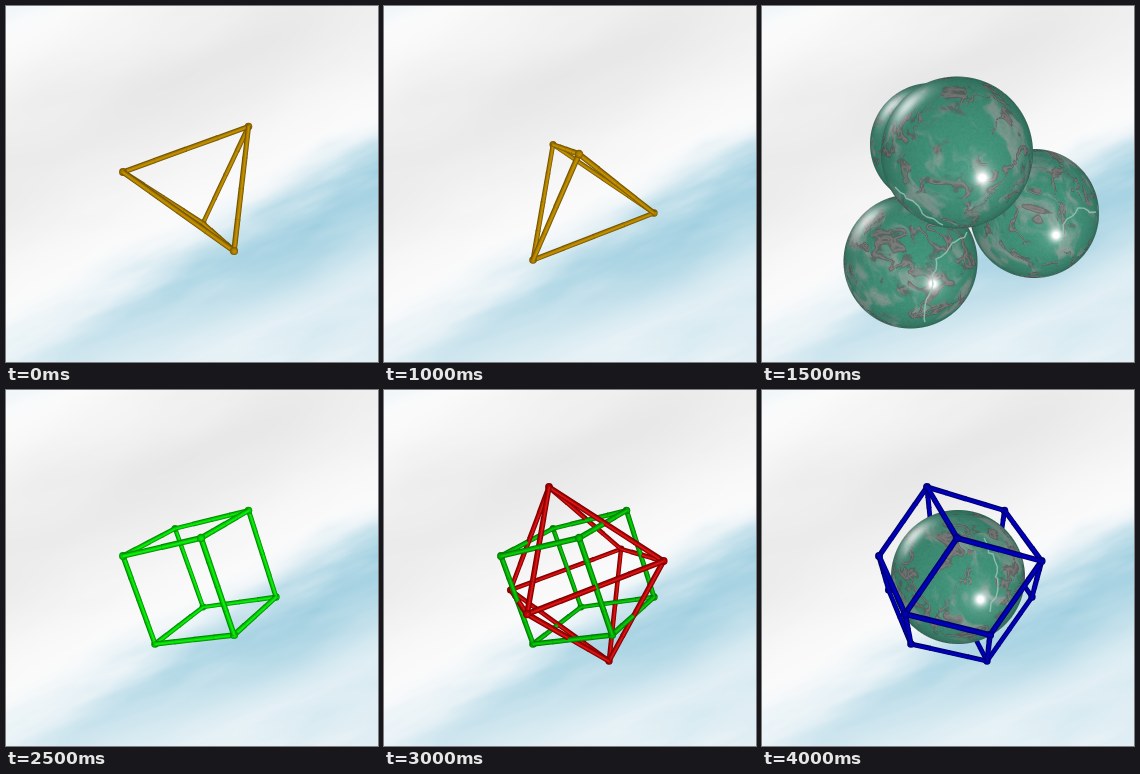
Recreate the animation shown at these times as an HTML page with a canvas. Size 372 by 356 pixels, loop 4.5 s.

```html
<!DOCTYPE html>
<html lang="en">
<head>
<meta charset="utf-8">
<title>Polyhedra and spheres</title>
<style>
  html, body { margin: 0; width: 100%; height: 100%; overflow: hidden; background: #eee; }
  canvas { display: block; }
</style>
</head>
<body>
<canvas id="stage" width="372" height="356"></canvas>
<script>
const W = 372, H = 356, STEP = 500;

// Each point: x, y, nearness (1 = closest)
const points = {
  A: [117, 166, .33], B: [242.5, 120.5, 0], C: [228, 245, .72], D: [197, 217, -.95],
  E: [195, 148, .95], F: [149, 254, .05], G: [270, 207, -.33], H: [169, 138.5, -.72],
  P: [165, 97, .25], Q: [279.5, 171, .65], R: [225, 271, -.25],
  S: [126.5, 200, -.65], T: [143, 224, 1], U: [237, 159, -1]
};
const TETRA = 'AB AC AD BC BD CD';
const DUAL = 'EF EG EH FG FH GH';
const CUBE = 'AH HB BE EA AF EC BG HD FC CG GD DF';
const OCTA = 'PQ PS PT PU RQ RS RT RU QT QU ST SU';
const RHOMBIC = 'PA PE PB PH TA TE TC TF QE QB QG QC RC RF RG RD SA SF SH SD UB UH UD UG';

// dark rim, body, highlight
const gold = ['#735300', '#a87a00', '#c39300'];
const lime = ['#008a00', '#00cc00', '#12ee12'];
const green = ['#007800', '#00ad00', '#10ca10'];
const red = ['#760000', '#b80000', '#d41c1c'];
const blue = ['#000068', '#0000a4', '#0000c4'];

const clamp = (v, lo = 0, hi = 1) => Math.min(hi, Math.max(lo, v));
const mix = (a, b, t) => a + (b - a) * t;
const mixColor = (a, b, t) => a.map((v, i) => mix(v, b[i], t));
const smooth = (a, b, v) => { const t = clamp((v - a) / (b - a)); return t * t * (3 - 2 * t); };
const bump = (v, center, width) => Math.exp(-(((v - center) / width) ** 2));

function hash(x, y, z) {
  let h = Math.imul(x, 374761393) ^ Math.imul(y, 668265263) ^ Math.imul(z, 1274126177);
  h = Math.imul(h ^ (h >>> 13), 1274126177);
  return ((h ^ (h >>> 16)) >>> 0) / 4294967296;
}

function noise(x, y, z) {
  const i = Math.floor(x), j = Math.floor(y), k = Math.floor(z);
  const u = smooth(0, 1, x - i), v = smooth(0, 1, y - j), w = smooth(0, 1, z - k);
  const row = (b, c) => mix(hash(i, b, c), hash(i + 1, b, c), u);
  const layer = c => mix(row(j, c), row(j + 1, c), v);
  return mix(layer(k), layer(k + 1), w);
}

function fractal(x, y, z, octaves) {
  let sum = 0, amp = .5, total = 0;
  for (let i = 0; i < octaves; i++, amp /= 2) {
    sum += amp * noise(x, y, z + i * 7);
    total += amp;
    x *= 2; y *= 2; z *= 2;
  }
  return sum / total;
}

function makeCanvas(w, h) {
  const canvas = document.createElement('canvas');
  canvas.width = w;
  canvas.height = h;
  return canvas;
}

function paintPixels(w, h, shade) {
  const canvas = makeCanvas(w, h), ctx = canvas.getContext('2d');
  const image = ctx.createImageData(w, h);
  for (let y = 0, i = 0; y < h; y++) {
    for (let x = 0; x < w; x++, i += 4) {
      const c = shade(x, y);
      if (c) image.data.set(c, i);
    }
  }
  ctx.putImageData(image, 0, 0);
  return canvas;
}

function skyColor(x, y) {
  const along = x * .92 - y * .39, across = x * .39 + y * .92;
  const streak = fractal(along / 80, across / 18, 3, 4);
  const broad = fractal(along / 170, across / 45, 40, 2);
  const s = y + .53 * x - 322 + (broad - .5) * 20 + (streak - .5) * 24;
  const band = smooth(-22, 50, s) * (1 - .62 * smooth(55, 140, s));
  const amount = band * mix(.32, .86, clamp(x / 300)) * (.62 + .66 * streak);
  const haze = bump(s, -155, 90) * (.75 + .5 * broad);
  const corner = .12 * smooth(-285, -330, s);
  const cloud = 252 - 18 * haze;
  return [...mixColor([cloud, cloud, cloud + .5], [152, 203, 222], clamp(amount + corner)), 255];
}

function marble(x, y, z) {
  const warp = fractal(x * 2, y * 2, z * 2, 3) - .5;
  const along = x * .5 + y * .86 + warp * .7, across = x * .86 - y * .5 + warp * .7;
  const cloud = fractal(along * 1.8, across * 4.6, z * 3 + 9, 4);
  const ridge = Math.abs(fractal(along * 2.5 + 5, across * 3.4, z * 2.8, 4) - .5);
  const mask = fractal(along * 3, across * 3.6 + 20, z * 3.6, 2);
  const grain = 1 + (noise(x * 45, y * 45, z * 45) - .5) * .07;
  const color = mixColor([65, 147, 122], [142, 162, 154], smooth(.5, .74, cloud) * .85);
  const vein = smooth(.075, .025, ridge) * smooth(.4, .54, mask);
  const stone = mixColor([92, 91, 90], [135, 128, 128], smooth(.05, 0, ridge));
  return mixColor(color, stone, vein * .9).map(v => v * grain);
}

function drawSphere(ctx, cx, cy, r, seed, dim = 1) {
  const size = Math.ceil(r * 2) + 4, x0 = Math.floor(cx - r) - 1, y0 = Math.floor(cy - r) - 1;
  const ball = paintPixels(size, size, (px, py) => {
    const x = (px + x0 + .5 - cx) / r, y = (py + y0 + .5 - cy) / r;
    const d = Math.hypot(x, y), alpha = clamp((1 - d) * r + .5);
    if (!alpha) return null;
    const z = Math.sqrt(Math.max(0, 1 - d * d));
    const light = dim * (.58 + .42 * Math.pow(z, .6) + .05 * (x + y) * z);
    let color = marble(x + seed, y + seed * 2, z).map(v => v * light);
    const turn = Math.atan2(y, x) + Math.PI * .76;
    const rim = bump(d, .9, .09) * bump(turn, 0, .36) * .75;
    const offSpot = Math.hypot(x - .335, y - .335);
    const shine = bump(offSpot, 0, .1) + bump(offSpot, 0, .25) * .16;
    color = mixColor(color, [255, 255, 255], clamp(rim + shine) * dim);
    return [...color, alpha * 255];
  });
  ctx.drawImage(ball, x0, y0);
}

function drawVein(ctx, ...path) {
  ctx.beginPath();
  ctx.moveTo(...path[0]);
  for (let i = 1; i < path.length; i++) {
    const [ax, ay] = path[i - 1], [bx, by] = path[i];
    const n = Math.ceil(Math.hypot(bx - ax, by - ay) / 6);
    for (let k = 1; k <= n; k++) {
      const jitter = c => k < n ? (hash(i, k, c) - .5) * 5 : 0;
      ctx.lineTo(mix(ax, bx, k / n) + jitter(1), mix(ay, by, k / n) + jitter(2));
    }
  }
  ctx.strokeStyle = 'rgba(165,205,190,.75)';
  ctx.lineWidth = 1.4;
  ctx.lineJoin = 'round';
  ctx.stroke();
}

function drawRod(ctx, a, b, depth, colors) {
  const len = Math.hypot(b[0] - a[0], b[1] - a[1]) || 1;
  const ux = (b[0] - a[0]) / len, uy = (b[1] - a[1]) / len;
  const width = 5.1 + .8 * depth;
  const shift = (ux - uy > 0 ? 1 : -1) * .4;
  [[1, 0], [.66, .5], [.25, 1]].forEach(([scale, off], i) => {
    const ox = -uy * shift * off, oy = ux * shift * off;
    ctx.strokeStyle = colors[i];
    ctx.lineWidth = width * scale;
    ctx.beginPath();
    ctx.moveTo(a[0] - ux * .5 + ox, a[1] - uy * .5 + oy);
    ctx.lineTo(b[0] + ux * .5 + ox, b[1] + uy * .5 + oy);
    ctx.stroke();
  });
}

function drawJoint(ctx, [x, y, depth], colors) {
  const r = 3.8 + .4 * depth;
  const fill = ctx.createRadialGradient(x + .8, y + .8, 0, x, y, r);
  fill.addColorStop(0, colors[2]);
  fill.addColorStop(.55, colors[1]);
  fill.addColorStop(1, colors[0]);
  ctx.fillStyle = fill;
  ctx.beginPath();
  ctx.arc(x, y, r, 0, 7);
  ctx.fill();
}

// Rods are cut into short pieces so that crossing ones overlap correctly.
function frameParts(edges, colors, joints = [...new Set(edges.replace(/ /g, ''))].join('')) {
  const parts = [];
  for (const [from, to] of edges.split(' ')) {
    const a = points[from], b = points[to], cuts = 4;
    for (let i = 0; i < cuts; i++) {
      const p = mixColor(a, b, i / cuts), q = mixColor(a, b, (i + 1) / cuts);
      const depth = (p[2] + q[2]) / 2;
      parts.push({ depth, draw: ctx => drawRod(ctx, p, q, depth, colors) });
    }
  }
  for (const name of joints) {
    const p = points[name];
    parts.push({ depth: p[2] + .01, draw: ctx => drawJoint(ctx, p, colors) });
  }
  return parts;
}

const drawParts = (...groups) => ctx =>
  groups.flat().sort((a, b) => a.depth - b.depth).forEach(part => part.draw(ctx));

function firstCluster(ctx) {
  drawSphere(ctx, 197, 217, 59, 1.3, .72);
  drawSphere(ctx, 243.5, 118.5, 66.5, 2.1);
  drawVein(ctx, [217, 66], [221, 84], [230, 101], [221, 123], [227, 145], [236, 173]);
  drawSphere(ctx, 115.5, 165.5, 69.5, 3.4);
  drawSphere(ctx, 229, 246.5, 73.5, 4.2);
  drawVein(ctx, [299, 228], [281, 242], [272, 258], [253, 270], [243, 290], [257, 304], [272, 302]);
  drawVein(ctx, [168, 216], [190, 194], [220, 181]);
}

function secondCluster(ctx) {
  drawSphere(ctx, 169, 138, 61, 5.3);
  drawSphere(ctx, 272.5, 207.5, 64.5, 6.2);
  drawVein(ctx, [298, 234], [305, 213], [316, 202], [334, 206]);
  drawSphere(ctx, 148.5, 255.5, 67, 7.1);
  drawVein(ctx, [205, 226], [187, 242], [174, 253], [171, 278], [163, 300], [163, 316]);
  drawSphere(ctx, 195, 146.5, 76, 8.4);
  drawVein(ctx, [133, 181], [151, 195], [165, 211], [181, 219]);
}

const core = {
  depth: 0,
  draw(ctx) {
    drawSphere(ctx, 196, 187, 67, 9.2);
    drawVein(ctx, [222, 148], [233, 171], [236, 196], [228, 222]);
  }
};

const scenes = [
  drawParts(frameParts(TETRA, gold)),
  firstCluster,
  drawParts(frameParts(DUAL, gold)),
  secondCluster,
  drawParts(frameParts(TETRA, gold), frameParts(DUAL, gold)),
  drawParts(frameParts(CUBE, lime)),
  drawParts(frameParts(CUBE, green), frameParts(OCTA, red)),
  drawParts(frameParts(CUBE, green), frameParts(OCTA, red), frameParts(RHOMBIC, blue, 'QTUEC')),
  drawParts(frameParts(RHOMBIC, blue), [core])
];

const sky = paintPixels(W, H, skyColor);
const pictures = scenes.map(draw => {
  const canvas = makeCanvas(W, H), ctx = canvas.getContext('2d');
  ctx.drawImage(sky, 0, 0);
  draw(ctx);
  return canvas;
});

const stage = document.getElementById('stage').getContext('2d');
stage.drawImage(pictures[0], 0, 0);
let start;
function tick(now) {
  start ??= now;
  stage.drawImage(pictures[Math.floor((now - start) / STEP) % pictures.length], 0, 0);
  requestAnimationFrame(tick);
}
requestAnimationFrame(tick);
</script>
</body>
</html>
```
